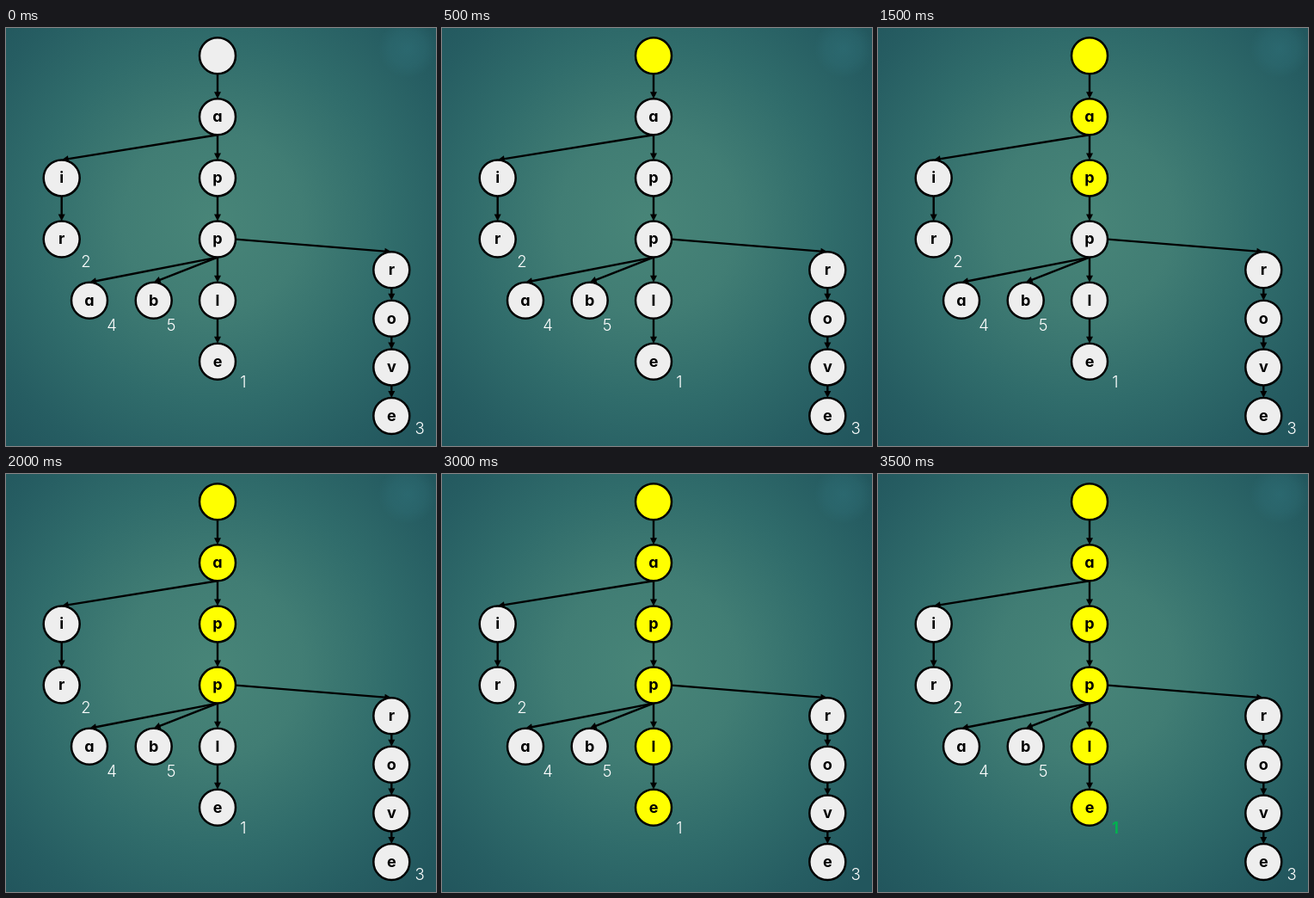
These frames come from a looping animation (500x486 px, 4 s). An HTML page:

```html
<!DOCTYPE html>
<html lang="en">
<head>
<meta charset="utf-8">
<title>Trie lookup</title>
<style>
  html, body { margin: 0; width: 100%; height: 100%; overflow: hidden; background: #24595f; }
  svg { display: block; width: 100%; height: 100%; }
  text { font-family: Inter, Lato, sans-serif; text-anchor: middle; }
  .node circle { fill: #eee; stroke: #000; stroke-width: 2.5; }
  .node text { font-size: 18px; font-weight: 700; font-feature-settings: "cv11"; }
  .edge { stroke: #000; stroke-width: 2.4; }
  .id { font-size: 18.5px; font-weight: 300; fill: #fff; }

  .node circle, .id { animation: 4s step-end infinite; }
  #n0 circle { animation-name: visit0; }
  #n1 circle { animation-name: visit1; }
  #n2 circle { animation-name: visit2; }
  #n3 circle { animation-name: visit3; }
  #n4 circle { animation-name: visit4; }
  #n5 circle { animation-name: visit5; }
  #id1 { animation-name: found; }
  @keyframes visit0 { 12.5%, 100% { fill: #ff0; } }
  @keyframes visit1 { 25%, 100% { fill: #ff0; } }
  @keyframes visit2 { 37.5%, 100% { fill: #ff0; } }
  @keyframes visit3 { 50%, 100% { fill: #ff0; } }
  @keyframes visit4 { 62.5%, 100% { fill: #ff0; } }
  @keyframes visit5 { 75%, 100% { fill: #ff0; } }
  @keyframes found { 87.5%, 100% { fill: #00b050; font-weight: 700; } }
</style>
</head>
<body>
<svg id="stage" viewBox="0 0 500 486">
  <defs>
    <radialGradient id="bg" gradientUnits="userSpaceOnUse" cx="240" cy="225" r="350">
      <stop offset="0" stop-color="#488578"/>
      <stop offset=".3" stop-color="#417d74"/>
      <stop offset=".6" stop-color="#306c6b"/>
      <stop offset=".85" stop-color="#265d62"/>
      <stop offset="1" stop-color="#22565d"/>
    </radialGradient>
    <radialGradient id="glow">
      <stop offset="0" stop-color="#2f7078" stop-opacity=".6"/>
      <stop offset=".6" stop-color="#2f7078" stop-opacity=".35"/>
      <stop offset="1" stop-color="#2f7078" stop-opacity="0"/>
    </radialGradient>
  </defs>
  <rect width="500" height="486" fill="url(#bg)"/>
  <circle cx="467" cy="24" r="34" fill="url(#glow)"/>
</svg>
<script>
  const stage = document.getElementById('stage');
  const R = 21;

  // letter, x, y, parent index
  const nodes = [
    ['', 246, 32.2], ['a', 246, 103.3, 0], ['p', 246, 174.4, 1],
    ['p', 246, 245.6, 2], ['l', 246, 316.7, 3], ['e', 246, 387.8, 4],
    ['i', 64.7, 174.4, 1], ['r', 64.7, 245.6, 6],
    ['a', 97, 316.7, 3], ['b', 171.7, 316.7, 3],
    ['r', 448.3, 281.3, 3], ['o', 448.3, 337.8, 10],
    ['v', 448.3, 394.4, 11], ['e', 448.3, 451, 12]
  ];
  const ids = [[1, 276, 418.4], [2, 93, 277.5], [3, 481, 471.5], [4, 123, 352], [5, 192, 352]];

  function add(parent, tag, attrs, text = '') {
    const el = document.createElementNS('http://www.w3.org/2000/svg', tag);
    for (const key in attrs) el.setAttribute(key, attrs[key]);
    el.textContent = text;
    return parent.appendChild(el);
  }

  function arrow(x1, y1, x2, y2) {
    const len = Math.hypot(x2 - x1, y2 - y1);
    const angle = Math.atan2(y2 - y1, x2 - x1) * 180 / Math.PI;
    const g = add(stage, 'g', { transform: `translate(${x1} ${y1}) rotate(${angle})` });
    add(g, 'line', { class: 'edge', x2: len - 5 });
    add(g, 'path', { d: `M${len} 0l-8 -4v8z` });
  }

  for (const [, x, y, parent] of nodes) {
    if (parent === undefined) continue;
    const [, px, py] = nodes[parent];
    if (x - px > 100) arrow(px + R, py, x, y - R);
    else arrow(px, py + R, x, y - R);
  }

  nodes.forEach(([letter, x, y], i) => {
    const g = add(stage, 'g', { class: 'node', id: 'n' + i });
    add(g, 'circle', { cx: x, cy: y, r: R });
    add(g, 'text', { x, y: y + 5.8 }, letter);
  });

  for (const [n, x, y] of ids) add(stage, 'text', { class: 'id', id: 'id' + n, x, y }, n);
</script>
</body>
</html>
```
